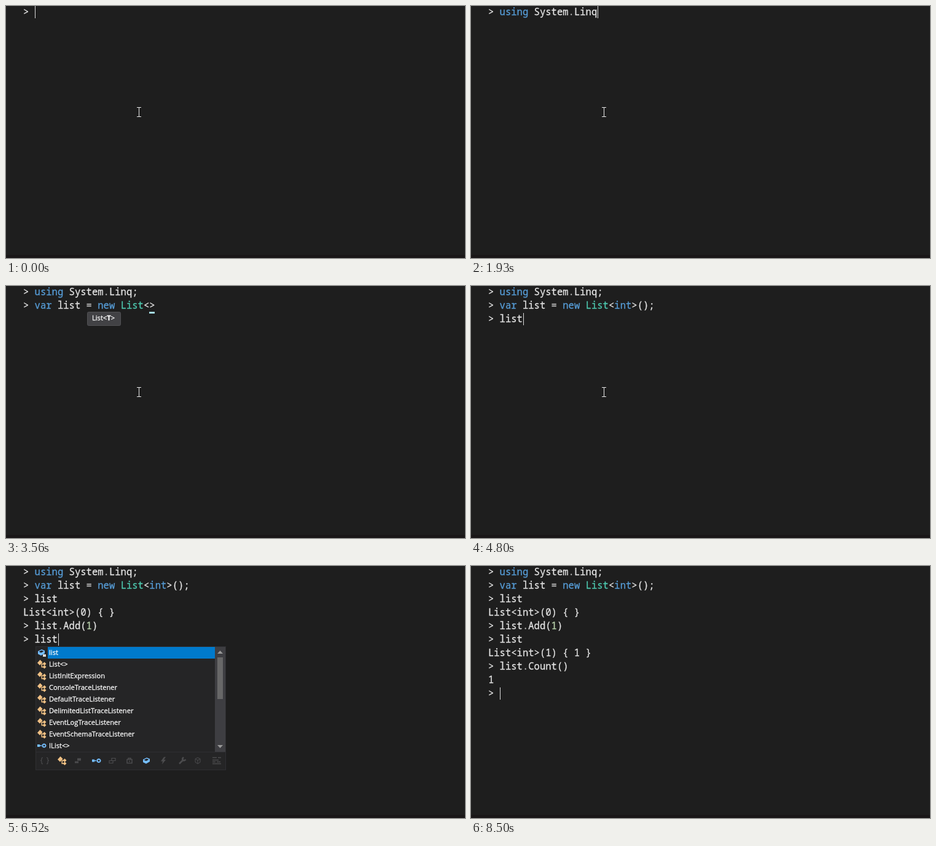
An HTML page with a canvas for the animation above (8.55 s loop, 747 by 411 pixels).

```html
<!DOCTYPE html>
<html lang="en">
<head>
<meta charset="utf-8">
<title>Interactive list session</title>
<style>
html, body { margin: 0; width: 100%; height: 100%; overflow: hidden; background: #1e1e1e; }
canvas { display: block; width: 747px; height: 411px; }
</style>
</head>
<body>
<canvas id="stage" width="747" height="411"></canvas>
<script>
const ctx = document.getElementById('stage').getContext('2d');
const LOOP = 8550, ADV = 9.335, LEFT = 46.6, LINE = 22;
const CODE = '15.56px "Noto Sans Mono", monospace';
const UI = '11.15px "Open Sans", "DejaVu Sans", sans-serif';
const DIM = '#4b4b4d', BLUE = '#75beff', ORANGE = '#f0c083', PURPLE = '#b180d7', INK = '#e4e4e4';

// name: [path around 0,0, colour, stroke width or 0 for fill]
const ICONS = {
  cube: ['M0-5L4-3V2.5L0 5L-4 2.5V-3ZM-4-3L0-.7L4-3M0-.7V5', PURPLE, 1.2],
  class: ['M-2.5-7L1.5-3L-3 2L-7-2ZM1-1H2L4.5-3.5L7.5-.5L4.5 2.5L2.5 .5H1V4H2L4.5 1.8L7.5 4.5L4.5 7.5L2.5 5.5H-.5V-1Z', ORANGE, 0],
  field: ['M0-5L5-3V1.5L-1 5L-6 2.5V-2ZM-4.5-1.2L-1 .5L3.5-1.8L0-3.6Z', BLUE, 0],
  iface: ['M-7-2H-3V-.7H1V.7H-3V2H-7ZM4-3.6A3.6 3.6 0 1 1 3.9-3.6ZM4-1.6A1.6 1.6 0 1 0 4.1-1.6Z', BLUE, 0],
  word: ['M-5-4H5V4H-5ZM-3-1H3M-3 1.5H3', '#c5c5c5', 1],
  braces: ['M-3-5Q-5-5-5-3T-6 0Q-5 0-5 3T-3 5M3-5Q5-5 5-3T6 0Q5 0 5 3T3 5', DIM, 1.2],
  parts: ['M-1-4H5V0H-1ZM-5 1H1V4H-5Z', DIM, 0],
  enumer: ['M-1-4H5V0H-1ZM-5 0H1V4H-5Z', DIM, 1.2],
  bag: ['M-4-2H4V4H-4ZM-2-2V-4H2V-2M-1 1H1', DIM, 1.5],
  bolt: ['M1-6L-4 1H-1L-2 6L4-1.5H1L4-6Z', DIM, 0],
  wrench: ['M-5 5L1-1M2-5.5Q-1-3 1-1T5.5-2', DIM, 2.6],
  dimCube: ['M0-5L4-3V2.5L0 5L-4 2.5V-3ZM-4-3L0-.7L4-3M0-.7V5', DIM, 1],
  extra: ['M-2-5L2-3V2L-2 4L-6 2V-3ZM-6-3L-2-1L2-3M-2-1V4M2 4H7M4.5 1V7', DIM, 1.1],
  lines: ['M-7-5H0M2-5H7M-7-1H3M-7 2H-2M0 2H6M-7 5H7', DIM, 1.3]
};
const WIDE_BAR = [['braces', 15], ['class', 43], ['parts', 69], ['iface', 99], ['enumer', 125], ['bag', 153],
  ['field', 181], ['bolt', 208], ['wrench', 239], ['dimCube', 264], ['lines', 295]];
const SLIM_BAR = [['wrench', 15], ['cube', 40], ['extra', 71]];

const rows = (icon, names) => names.split(' ').map(name => [icon, name]);
const listTypes = [
  ...rows('class', 'List<> ListInitExpression ConsoleTraceListener DefaultTraceListener ' +
    'DelimitedListTraceListener EventLogTraceListener EventSchemaTraceListener'),
  ['iface', 'IList<>']
];
const listRows = [['field', 'list'], ...listTypes];
const newRows = [...listTypes, ['iface', 'IListSource']];
const usingRows = [...rows('word', 'using uint ulong unchecked unsafe ushort'), ...rows('class', 'UIntPtr UInt16 UInt32')];
const varRows = [...rows('word', 'var virtual void volatile'),
  ...rows('class', 'ValueTuple ValueType Version Volatile Vector')];
const intRows = [['word', 'int'], ...rows('class', 'Int16 Int32 Int64 IntPtr'),
  ...rows('class', 'InterpolatedStringHandler Interlocked Internal UInt32')];
const addRows = rows('cube', '★_Add ★_AddRange Add AddRange').map(([i, n]) => [i, n.replace('_', ' ')]);
const countRows = rows('cube', 'Count Contains ConvertAll Concat CopyTo Capacity Clear Cast<> LongCount');

// from, to, line, column, width, rows, extra offset down
const popups = [
  [110, 800, 0, 0, 282, usingRows],
  [1000, 1380, 0, 6, 136, rows('braces', 'System Microsoft')],
  [1480, 1840, 0, 13, 142, rows('braces', 'Linq Globalization')],
  [2150, 2350, 1, 0, 282, varRows],
  [3170, 3470, 1, 15, 310, newRows],
  [3720, 4080, 1, 20, 310, intRows, 22],
  [4520, 4790, 2, 0, 310, listRows],
  [5000, 5350, 4, 0, 310, listRows],
  [5500, 5900, 4, 5, 136, addRows],
  [6320, 6580, 5, 0, 310, listRows],
  [6820, 7530, 7, 0, 310, listRows],
  [7700, 8000, 7, 5, 132, countRows]
].map(([from, to, line, col, w, items, down = 0]) => ({
  from, to, w, items, x: Math.round(47.5 + col * ADV), y: line * LINE + 21 + down, h: items.length * 19 + 31
}));

const events = [];
const prompt = (t, line) => events.push({ t, line, text: '', col: 0 });
const output = (t, line, text) => events.push({ t, line, text, out: true });
function type(line, before, str, t0, t1 = t0, after = '') {
  for (let i = 1; i <= str.length; i++) events.push({
    t: t0 + (i - 1) * (t1 - t0) / Math.max(1, str.length - 1), line,
    text: before + str.slice(0, i) + after, col: before.length + i, open: after !== ''
  });
}
const decl = 'var list = new List<';
prompt(0, 0);
type(0, '', 'using ', 40, 840);
type(0, 'using ', 'System', 940, 1300);
type(0, 'using System', '.Linq', 1400, 1740);
type(0, 'using System.Linq', ';', 1970);
prompt(2050, 1);
type(1, '', 'var', 2110, 2300);
type(1, 'var', ' list ', 2350, 2650);
type(1, 'var list ', '= new L', 2750, 2970);
type(1, 'var list = new L', 'ist', 3220, 3400);
type(1, 'var list = new List', '<', 3480, 3480, '>');
type(1, decl, 'int', 3660, 3860, '>');
type(1, decl + 'int', '>();', 4080, 4320);
prompt(4400, 2);
type(2, '', 'list', 4480, 4720);
output(4880, 3, 'List<int>(0) { }');
prompt(4880, 4);
type(4, '', 'list', 4950, 5220);
type(4, 'list', '.', 5350);
type(4, 'list.', 'Ad', 5480, 5600);
type(4, 'list.Ad', 'd', 5800);
type(4, 'list.Add', '(1)', 5900, 6080);
prompt(6200, 5);
type(5, '', 'list', 6280, 6520);
output(6700, 6, 'List<int>(1) { 1 }');
prompt(6700, 7);
type(7, '', 'lis', 6770, 7150);
type(7, 'lis', 't.', 7450, 7530);
type(7, 'list.', 'Count', 7630, 7900);
type(7, 'list.Count', '()', 8000, 8100);
output(8400, 8, '1');
prompt(8400, 9);

function rect(x, y, w, h, color) {
  ctx.fillStyle = color;
  ctx.fillRect(x, y, w, h);
}
// A hairline outline gives the text a little more weight.
function text(str, x, y, color, font) {
  ctx.font = font;
  ctx.fillStyle = ctx.strokeStyle = color;
  ctx.lineWidth = .3;
  ctx.fillText(str, x, y);
  ctx.strokeText(str, x, y);
}
function shape(d, x, y, color, width) {
  const path = new Path2D(d);
  ctx.save();
  ctx.translate(x, y);
  ctx.fillStyle = ctx.strokeStyle = color;
  ctx.lineWidth = width;
  if (width) ctx.stroke(path); else ctx.fill(path, 'evenodd');
  ctx.restore();
}
function icon(name, x, y) {
  const [d, color, width] = ICONS[name];
  shape(d, x, y, color, width);
}

function tokenColor(s) {
  if (/^(using|var|new|int)$/.test(s)) return '#569cd6';
  if (s === 'List') return '#4ec9b0';
  if (/^\d/.test(s)) return '#b5cea8';
  return /^[.=]$/.test(s) ? '#b4b4b4' : INK;
}
function codeLine({ line, text: str, out }) {
  const y = line * LINE + 15, start = LEFT - 2 * ADV;
  if (out) return text(str, start, y, INK, CODE);
  text('>', start, y, INK, CODE);
  for (const m of str.matchAll(/\w+|[^\w\s]/g))
    text(m[0], LEFT + m.index * ADV, y, tokenColor(m[0]), CODE);
}

function popup({ x, y, w, h, items }) {
  const scroll = items.length > 8, end = y + 1 + items.length * 19;
  rect(x, y, w, h, '#2f2f32');
  rect(x + 1, y + 1, w - 2, h - 2, '#252526');
  rect(x + 20, y + 1, w - (scroll ? 38 : 21), 19, '#007acc');
  items.forEach(([kind, name], i) => {
    const cy = y + 10 + i * 19;
    icon(kind, x + (kind === 'cube' ? 8 : 10), cy);
    if (kind === 'field') rect(x + 12, cy + 3, 5, 4, '#d8d8d8');
    text(name, x + 22, cy + 4, '#fafafa', UI);
  });
  if (scroll) {
    rect(x + w - 18, y + 1, 17, end - y - 1, '#3e3e42');
    rect(x + w - 14, y + 18, 9, 68, '#686868');
    shape('M-4.5 2L0-3L4.5 2Z', x + w - 9.5, y + 10, '#999', 0);
    shape('M-4.5-2L0 3L4.5-2Z', x + w - 9.5, y + 163, '#999', 0);
  }
  rect(x + 1, end, w - 2, 1, '#2f2f32');
  for (const [kind, dx] of w > 200 ? WIDE_BAR : SLIM_BAR)
    if (dx < w - 8) icon(kind, x + dx, end + 14.5);
}

function tooltip() {
  ctx.fillStyle = '#424245';
  ctx.strokeStyle = '#515154';
  ctx.lineWidth = 1;
  ctx.beginPath();
  ctx.roundRect(132.5, 42.5, 54, 22, 2);
  ctx.fill();
  ctx.stroke();
  let x = 140;
  for (const [s, weight] of [['List<', ''], ['T', 'bold '], ['>', '']]) {
    text(s, x, 56, '#fafafa', weight + UI);
    x += ctx.measureText(s).width;
  }
}

function mouse(arrow) {
  if (!arrow) return shape('M-3.5-7.5H3.5M0-7V7M-3.5 7.5H3.5', 216.5, 173, '#e8e8e8', 1);
  const d = 'M0 0V16L3.8 12.5L6.5 18.5L9 17.4L6.4 11.5H11.5Z';
  shape(d, 215, 173, '#000', 2);
  shape(d, 215, 173, '#fff', 0);
}

function draw(t) {
  rect(0, 0, 747, 411, '#1e1e1e');
  rect(0, 406, 747, 5, '#1a1718');
  if (t >= 8100 && t < 8500) rect(LEFT + 10 * ADV, 154, 2 * ADV, 22, '#113d6f');

  const lines = [];
  let caret;
  for (const e of events) if (e.t <= t) {
    lines[e.line] = e;
    if (!e.out) caret = e;
  }
  lines.forEach(codeLine);

  const x = Math.ceil(LEFT + .4 + caret.col * ADV), y = caret.line * LINE;
  if (caret.open) rect(x - 1, y + 20, 9, 3, '#a5dce4');
  else rect(x, y, 1, 20, '#dcdcdc');

  if (t >= 3520 && t < 4080) tooltip();
  const shown = popups.filter(p => t >= p.from && t < p.to);
  shown.forEach(popup);
  if (t < 5900) mouse(shown.some(p => p.x < 216 && p.x + p.w > 216 && p.y < 173 && p.y + p.h > 173));
}

function tick() {
  draw(performance.now() % LOOP);
  requestAnimationFrame(tick);
}
tick();
</script>
</body>
</html>
```
